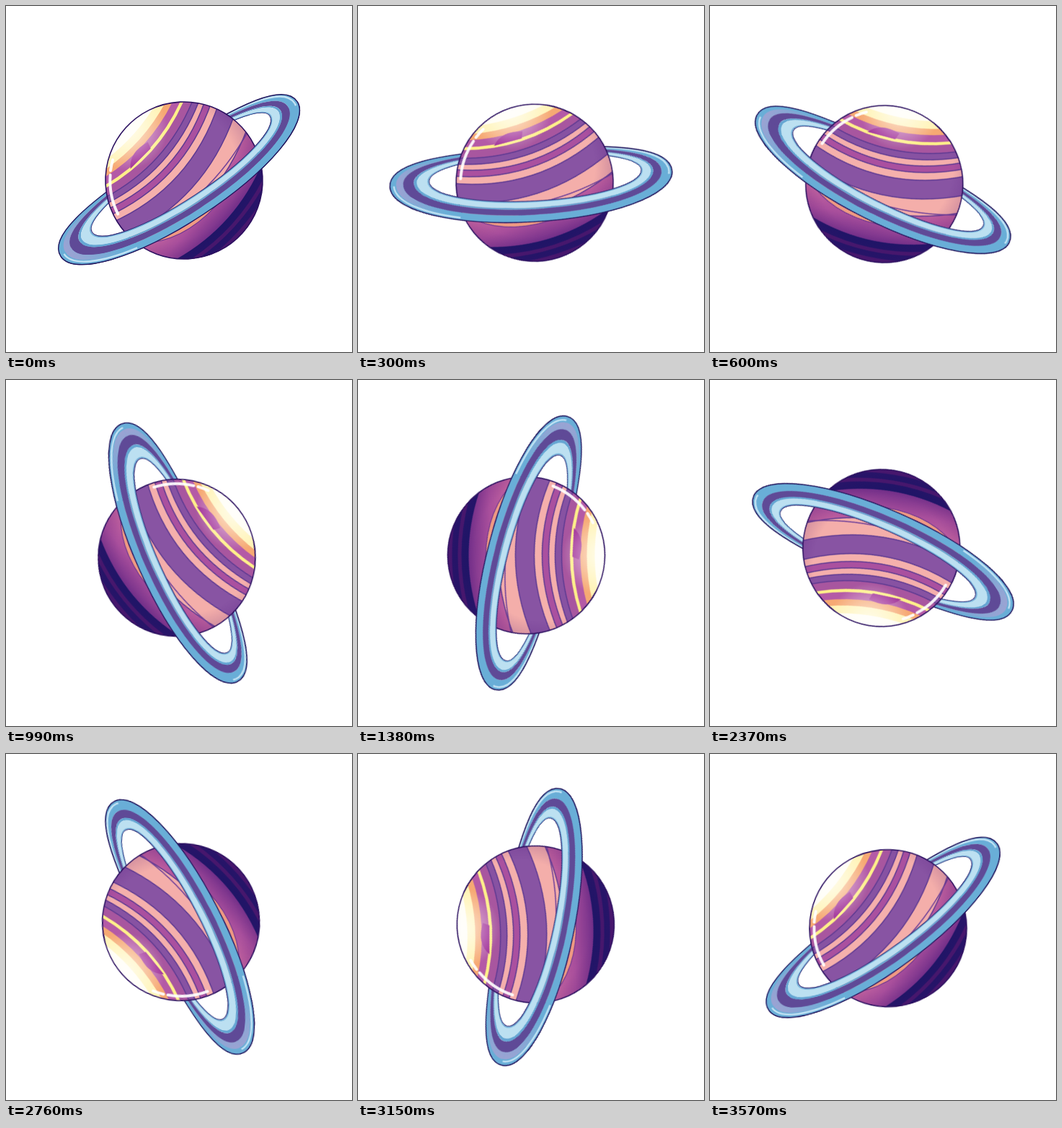
Animation, 480 px wide and 480 px high, one loop 3600 ms. Source, as an HTML page:

```html
<!DOCTYPE html>
<html lang="en">
<head>
<meta charset="utf-8">
<title>Ringed planet</title>
<style>
  html, body { margin: 0; width: 100%; height: 100%; overflow: hidden; background: #fff; }
  svg { display: block; width: 100vw; height: 100vh; }
  #spin { transform-origin: 0 0; animation: spin 3.6s steps(120, end) infinite; }
  @keyframes spin { to { transform: rotate(360deg); } }
</style>
</head>
<body>
<svg viewBox="-240 -240 480 480">
  <defs>
    <clipPath id="disc"><circle r="109"/></clipPath>
    <clipPath id="front"><rect x="-200" y="0" width="400" height="70"/></clipPath>
    <linearGradient id="magenta" gradientUnits="userSpaceOnUse" x1="0" y1="15" x2="0" y2="80">
      <stop offset="0" stop-color="#c8679f"/>
      <stop offset=".55" stop-color="#a94f9c"/>
      <stop offset="1" stop-color="#74308a"/>
    </linearGradient>
    <radialGradient id="shade" gradientUnits="userSpaceOnUse" cx="-6" cy="-24" r="138">
      <stop offset=".7" stop-color="#4a1270" stop-opacity="0"/>
      <stop offset="1" stop-color="#4a1270" stop-opacity=".32"/>
    </radialGradient>
    <radialGradient id="glow" gradientUnits="userSpaceOnUse" cx="0" cy="-106" r="56">
      <stop offset="0" stop-color="#fff" stop-opacity=".75"/>
      <stop offset="1" stop-color="#fff" stop-opacity="0"/>
    </radialGradient>
    <linearGradient id="lavender" gradientUnits="userSpaceOnUse" x1="-185" y1="0" x2="-120" y2="0">
      <stop offset="0" stop-color="#9aa3d3"/>
      <stop offset="1" stop-color="#9aa3d3" stop-opacity="0"/>
    </linearGradient>
    <g id="ring"></g>
  </defs>
  <g id="spin">
    <use href="#ring" transform="rotate(-33.2)"/>
    <g transform="translate(7 2) rotate(-48)">
      <g clip-path="url(#disc)">
        <circle r="109" fill="#fffdf2"/>
        <g id="bands" stroke-width="1.5"></g>
        <path d="M-38-66Q-22-83 6-73L2-64Z" fill="#a02f98"/>
        <path d="M-94 24Q-48 49 20 56Q-52 60-94 24Z" fill="#f09a82" stroke="#6b3590"/>
        <path d="M-112 2Q0 46 112 20" fill="none" stroke="#74449a" stroke-width="1.6"/>
        <circle r="109" fill="url(#shade)"/>
        <circle r="109" fill="url(#glow)"/>
        <path d="M-96-37A103 103 0 0 1-63-81M-58-85A103 103 0 0 1-45-92.600" fill="none" stroke="#fff" stroke-width="4" stroke-linecap="round" opacity=".92"/>
      </g>
      <circle r="109" fill="none" stroke="#2b1060" stroke-width="1.6"/>
    </g>
    <g transform="rotate(-33.2)"><use href="#ring" clip-path="url(#front)"/></g>
  </g>
</svg>
<script>
  // Bands run from the bright pole down: height at centre, height at both ends, fill, edge.
  const edge = '#5e3a92';
  const bands = [
    [-95, -118, '#fff3b4'],
    [-84, -108, '#f6a973'],
    [-75, -100, '#b45aa6'],
    [-65, -90, '#fff08a'],
    [-60.5, -86, '#a8569f'],
    [-49, -74, '#8752a2', edge],
    [-40, -65, '#f5afac', edge],
    [-31, -57, '#aa509f', edge],
    [-22, -47, '#f5b0ac', edge],
    [-11, -36, '#8854a3', edge],
    [15, -8, '#f4aeaa', edge],
    [39, 17, 'url(#magenta)', edge],
    [80, 56, '#1c1566'],
    [90, 68, '#46186c'],
    [95, 74, '#1c1566'],
    [103, 84, '#46186c']
  ];
  document.getElementById('bands').innerHTML = bands.map(([mid, end, fill, stroke = 'none']) =>
    `<path d="M-112 ${end}Q0 ${2 * mid - end} 112 ${end}V115H-112Z" fill="${fill}" stroke="${stroke}"/>`
  ).join('');

  // Ring depth s: 0 at the outer rim, 1 at the hole. The far half is flatter than the near one.
  const loop = s => {
    const mix = (from, to) => from + (to - from) * s;
    const x = 6 * s, y = -4.3 * s, a = mix(196, 147.3);
    const half = (dir, b, k) =>
      `C${x - dir * a} ${y - dir * b * k} ${x - dir * a * k} ${y - dir * b} ${x} ${y - dir * b}` +
      `S${x + dir * a} ${y - dir * b * k} ${x + dir * a} ${y}`;
    return `M${x - a} ${y}${half(1, mix(43, 30), mix(.7, .57))}${half(-1, mix(59.5, 35), .56)}Z`;
  };
  const band = (from, to, fill) =>
    `<path d="${loop(from)}${loop(to)}" fill-rule="evenodd" fill="${fill}"/>`;
  const line = (s, color, width, extra = '') =>
    `<path d="${loop(s)}" fill="none" stroke="${color}" stroke-width="${width}" ${extra}/>`;

  document.getElementById('ring').innerHTML =
    band(0, .34, '#69aed7') +
    band(.16, .34, 'url(#lavender)') +
    band(.34, .61, '#5f4a97') +
    band(.61, .69, '#65a6d3') +
    band(.69, 1, '#bce0f1') +
    line(.1, '#c3e3f4', 2.4, 'pathLength="100" stroke-dasharray="13 37 13 37" stroke-dashoffset="-37"') +
    line(.97, '#6faed8', 1.6) +
    line(1, '#2f2470', 1) +
    line(0, '#20145c', 1.4);
</script>
</body>
</html>
```
